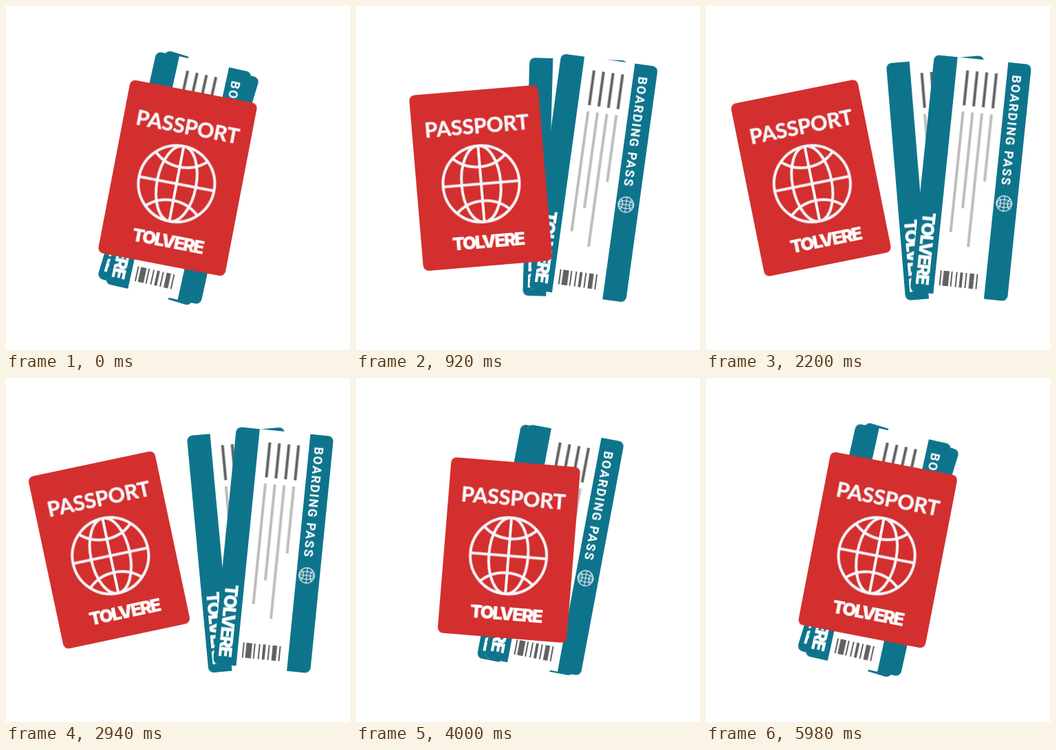
Write an HTML page that moves like this. It is 500 by 500 pixels and loops after 6 s.

```html
<!DOCTYPE html>
<html lang="en">
<head>
<meta charset="utf-8">
<title>Passport and boarding passes</title>
<style>
  html, body { margin: 0; width: 100%; height: 100%; overflow: hidden; background: #fff; }
  svg { display: block; width: 100vw; height: 100vh; }

  .item {
    transform: translate(250px, 250px) rotate(var(--from));
    animation: fan 6s cubic-bezier(.2, 0, .07, 1) -70ms infinite;
  }
  .back     { --from: 17deg;   --x: 349.4px; --to: -5.3deg; }
  .front    { --from: 12.5deg; --x: 388.5px; --to: 5.7deg; }
  .passport { --from: 11deg;   --x: 150px;   --to: -12deg; }

  @keyframes fan {
    0%, 100% { transform: translate(250px, 250px) rotate(var(--from)); }
    50%      { transform: translate(var(--x), 250px) rotate(var(--to)); }
  }

  .teal { fill: #0e748c; }
  .dark { stroke: #616161; }
  .pale { stroke: #bdbdbd; }
  .brand { font: 900 26px Inter, sans-serif; letter-spacing: -2.2px; fill: #fff; text-anchor: middle; }
  .label { font: 700 18px Roboto, sans-serif; letter-spacing: 1.85px; fill: #fff; }
  .title {
    font: 700 30.3px Lato, sans-serif; text-anchor: middle;
    fill: #f8f4f8; stroke: #f8f4f8; stroke-width: .6px;
  }
</style>
</head>
<body>
<svg viewBox="0 0 500 500">
  <defs>
    <clipPath id="card"><rect x="-71" y="-173" width="142" height="346" rx="8"/></clipPath>

    <g id="globe" fill="none" stroke="#f8f4f8">
      <circle r="55.5"/>
      <ellipse rx="28.5" ry="55.5"/>
      <path d="M0-55.5V55.5M-55.5 0H55.5M-39-40.5A56 56 0 0 0 39-40.5M-39 40.5A56 56 0 0 1 39 40.5"/>
    </g>

    <g id="pass">
      <g clip-path="url(#card)">
        <rect x="-71" y="-173" width="142" height="346" fill="#fff"/>
        <rect class="teal" x="-71" y="-173" width="34" height="346"/>
        <rect class="teal" x="37" y="-173" width="34" height="346"/>
      </g>
      <path class="dark" stroke-width="4" d="M-20.5-155v51M-6.5-155v51M7.5-155v51M21.5-155v51"/>
      <path class="pale" stroke-width="4" d="M-21-95V81M-7.2-95V45M6.5-95V100M20.5-95V3"/>
      <g class="dark">
        <path stroke-width="2" d="M-29 138v22M-13 138v22M-6 138v22M8 138v22M24 138v22"/>
        <path stroke-width="8.5" d="M-21 138v22"/>
        <path stroke-width="4" d="M1 138v22"/>
        <path stroke-width="6.5" d="M16.3 138v22"/>
      </g>
      <text class="label" transform="translate(45.2 -155.5) rotate(90)">BOARDING PASS</text>
      <use href="#globe" transform="translate(52 32) rotate(90) scale(.2)" stroke-width="5.5"/>
      <text class="brand" transform="translate(-64.5 108) rotate(90)">TOLVERE</text>
    </g>
  </defs>

  <use class="item back" href="#pass"/>
  <use class="item front" href="#pass"/>

  <g class="item passport">
    <rect x="-94" y="-128" width="188" height="256" rx="8" fill="#d32f2f"/>
    <text class="title" x=".5" y="-65.5">PASSPORT</text>
    <use href="#globe" transform="translate(0 8.5)" stroke-width="4"/>
    <text class="brand" x="3" y="102">TOLVERE</text>
  </g>
</svg>
</body>
</html>
```
